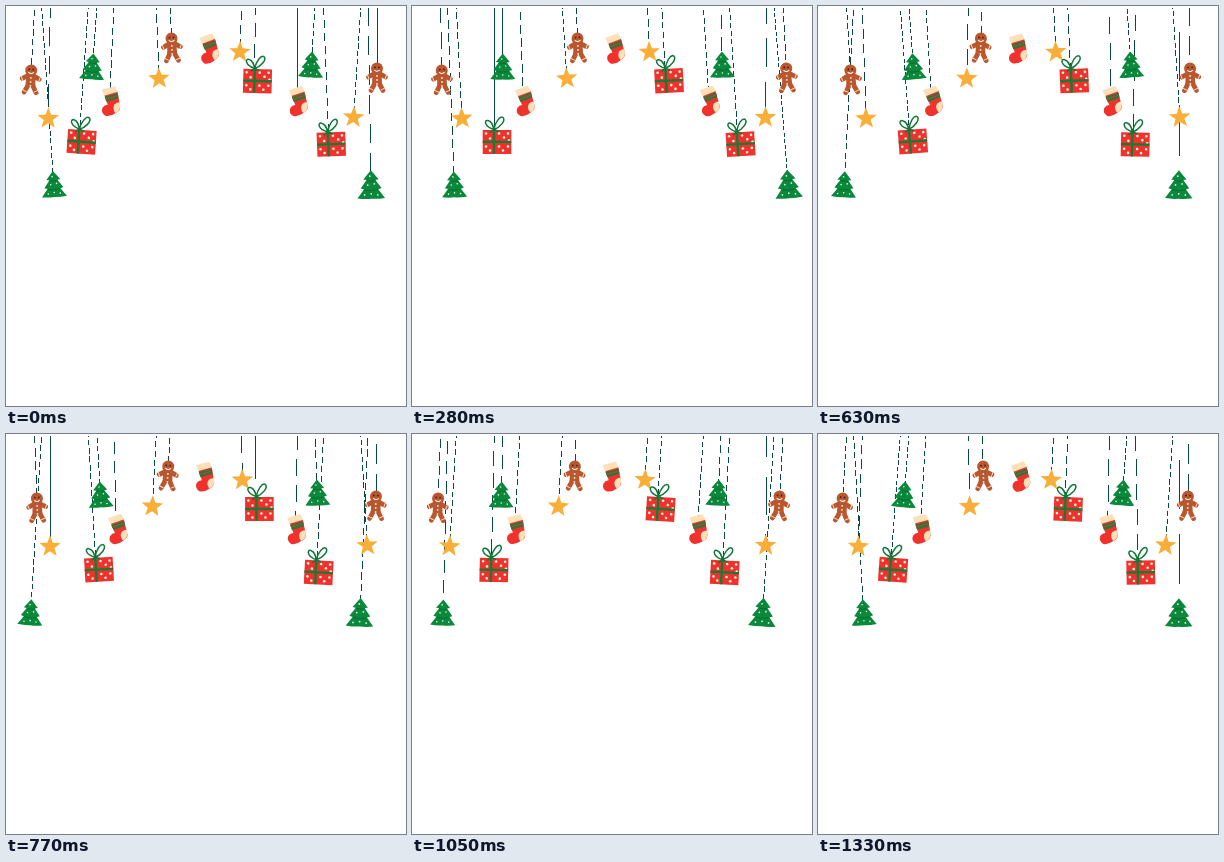
An HTML page with a canvas that plays this animation: 400 by 400 pixels, repeating every 1.4 s.

```html
<!DOCTYPE html>
<html lang="en">
<head>
<meta charset="utf-8">
<title>Swinging ornaments</title>
<style>
html, body { margin: 0; width: 100%; height: 100%; overflow: hidden; background: #fff; }
canvas { display: block; }
</style>
</head>
<body>
<canvas id="stage" width="400" height="400"></canvas>
<script>
const ctx = document.getElementById('stage').getContext('2d');
const LOOP = 1400, STEP = 70;
const GREEN = '#0a883c', RED = '#f0322c', CREAM = '#fbe0b8', BROWN = '#b9572f';

function fillPath(d, color) {
  ctx.fillStyle = color;
  ctx.fill(new Path2D(d));
}

function strokePath(d, color, width) {
  ctx.strokeStyle = color;
  ctx.lineWidth = width;
  ctx.stroke(new Path2D(d));
}

function dots(points, r, color) {
  ctx.fillStyle = color;
  for (const [x, y] of points) {
    ctx.beginPath();
    ctx.arc(x, y, r, 0, 7);
    ctx.fill();
  }
}

// Each ornament is drawn around its own centre; top is where the string ends.
const kinds = {
  tree: { top: -12, draw() {
    fillPath('M0-13.5 L7-5 L4-4.5 L9.5 3 L6.5 4 L12.5 12 Q6 13 0 12.5 Q-6 13-12.5 12 L-6.5 4 L-9.5 3 L-4-4.5 L-7-5Z', GREEN);
    strokePath('M-4-4 Q0-3 4-4 M-6 4.5 Q0 6 6 4.5', '#06682c', .8);
    dots([[-1, -8], [-3, 0], [3, -1], [-6, 9], [0, 8], [6, 9]], .8, '#e4f5d8');
  } },
  star: { top: -9, draw() {
    ctx.beginPath();
    for (let i = 0; i < 10; i++) {
      const r = i % 2 ? 4.7 : 11.3, a = i * Math.PI / 5;
      ctx.lineTo(r * Math.sin(a), .6 - r * Math.cos(a));
    }
    ctx.fillStyle = '#f9ae38';
    ctx.fill();
  } },
  ginger: { top: -15, draw() {
    ctx.lineCap = 'round';
    strokePath('M-8.5-1 L-4-3.5 H4 L8.5-1 M-2 5 L-6 12.5 M2 5 L6 12.5', BROWN, 4.8);
    fillPath('M-4.5-6 H4.5 L5 7 H-5Z', BROWN);
    dots([[0, -9.5]], 6, BROWN);
    strokePath('M-9.5-3 L-8 1 M9.5-3 L8 1 M-8 10 L-4 12 M8 10 L4 12', '#f6dcc4', 1);
    strokePath('M-2.5-7.5 Q0-5.5 2.5-7.5', '#fff', 1);
    dots([[-2, -10.5], [2, -10.5]], .9, '#4a2012');
    dots([[0, -2], [0, 2], [0, 6]], .9, '#f8e6d4');
    ctx.lineCap = 'butt';
  } },
  sock: { top: -13, draw() {
    fillPath('M-7-6 L6-10 L9 3 Q11 9 5 12 Q0 16-5 15 Q-10 12-8 7 Q-6 4-3 4Z', RED);
    fillPath('M9 1 Q11 9 5 12 Q1 7 4 3Q6 1 9 1Z', CREAM);
    fillPath('M-6.5-4 L6.5-8 L7.5-3 L-4.5 1Z', '#26793a');
    strokePath('M-5.5-1.7 L7-5.7', RED, .9);
    fillPath('M-9.5-11 L3.5-15 L6.5-9.5 L-7-5Z', CREAM);
  } },
  gift: { top: -14, draw() {
    ctx.fillStyle = RED;
    ctx.fillRect(-14.3, -11.5, 28.6, 24);
    const spots = [[-11, -8], [-7, -3], [2, -8], [7, -4], [11, -8], [12, -1],
      [-11, 5], [-7, 9], [2, 5], [6, 9], [11, 5]];
    dots(spots, 1.3, '#fff0e4');
    ctx.fillStyle = '#1a7a35';
    ctx.fillRect(-4.2, -11.5, 2.4, 24);
    ctx.fillRect(-14.3, -.8, 28.6, 2.4);
    strokePath('M-3-12 C-13-15-13-22-9-21 C-5-20-4-16-3-12 C-2-19 3-26 6-24 C9-21 3-14-3-12 M-3-12 L-7-9 M-3-12 L2-10',
      '#12773a', 1.5);
  } }
};

// kind, pivot x, centre y, offset from string, swing, time of rightmost pose, scale, sharpness
const ornaments = [
  ['ginger', 28.5, 74, 0, 4.7, 560],
  ['tree', 35.5, 179, 0, 12, 70, 1, 1],
  ['star', 44.2, 112, 0, 6.9, 415],
  ['gift', 82.2, 135.5, 2.8, 9.9, 630],
  ['tree', 90.8, 61, 0, 4.6, 630],
  ['sock', 107.8, 95, 1.5, 6.8, 505],
  ['star', 150.2, 72, 0, 4.8, 210],
  ['ginger', 164, 42, 0, 2.4, 140],
  ['sock', 201.3, 42.5, 0, 2.4, 140],
  ['star', 235.5, 45.5, 0, 3, 480],
  ['gift', 249.7, 74.5, 3.5, 4.9, 430],
  ['sock', 291.3, 95, 1, 5.9, 350],
  ['tree', 308.8, 59, 0, 4.4, 560],
  ['gift', 317.5, 138, 2.5, 9, 210],
  ['star', 354.7, 111, 0, 7.2, 670],
  ['tree', 362, 179, 0, 13, 280, 1.1, 1.2],
  ['ginger', 371, 72, 0, 4, 350]
];

// A hairline that breaks up wherever it slips between pixel columns.
function drawString(pivot, slope, end) {
  ctx.fillStyle = '#0b4a40';
  for (let y = 2; y < end; y++) {
    const x = pivot + slope * y;
    if (2 * x % 1 < .66) ctx.fillRect(Math.floor(x), y, 1, 1);
  }
}

function draw(now) {
  const t = Math.floor(now / STEP) * STEP % LOOP;
  ctx.clearRect(0, 0, 400, 400);
  const poses = ornaments.map(([name, pivot, y, dx, swing, peak, scale = 1, sharp = 0]) => {
    const phase = 2 * Math.PI * (t - peak) / LOOP;
    const shift = swing * Math.cos(phase) + sharp * Math.cos(2 * phase);
    // The short sock at the top has no visible string.
    const hung = name !== 'sock' || y > 50;
    return { kind: kinds[name], pivot, y, dx, scale, slope: shift / y, hung };
  });
  for (const p of poses) {
    if (p.hung) drawString(p.pivot, p.slope, p.y + p.kind.top * p.scale);
  }
  for (const p of poses) {
    ctx.save();
    ctx.translate(p.pivot, 0);
    ctx.rotate(-Math.atan(p.slope));
    ctx.translate(p.dx, p.y);
    ctx.scale(p.scale, p.scale);
    p.kind.draw();
    ctx.restore();
  }
  requestAnimationFrame(draw);
}
requestAnimationFrame(draw);
</script>
</body>
</html>
```
